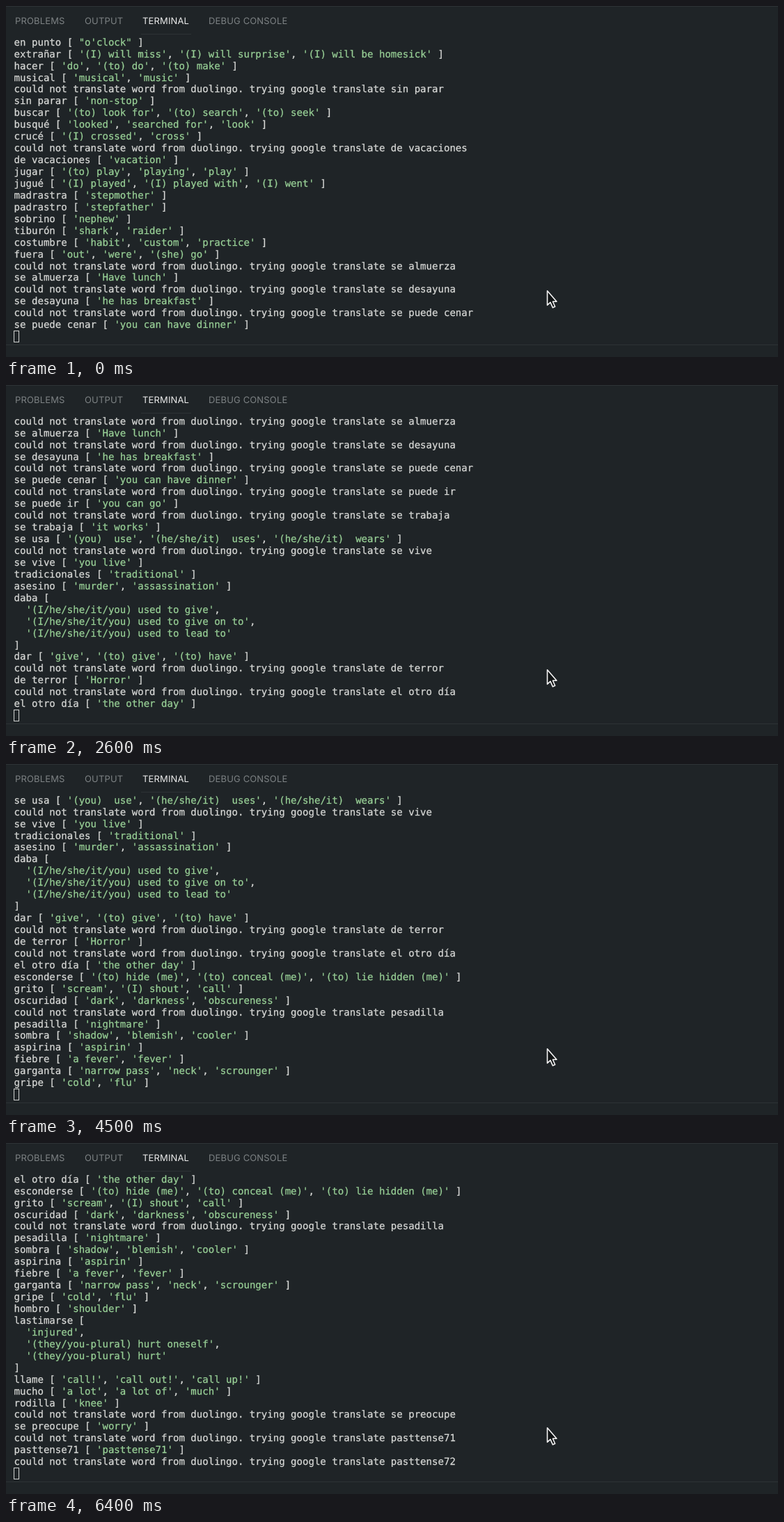
An HTML page that plays this animation: 1109 px wide and 505 px high, repeating every 6500 ms.

```html
<!DOCTYPE html>
<html lang="en">
<head>
<meta charset="utf-8">
<title>Terminal log</title>
<style>
  html, body { margin: 0; width: 100%; height: 100%; overflow: hidden; background: #1f2427; }
  body { position: relative; text-rendering: geometricPrecision; }
  body > * { position: absolute; }
  .tab { top: 14px; font: 13px/16px Inter, sans-serif; letter-spacing: .15px; color: #7d8284; white-space: pre; }
  .on { color: #ececec; }
  .rule { left: 0; width: 100%; height: 1px; background: #2d3335; }
  #log { left: 11.6px; top: 44.7px; margin: 0; font: 14.06px/16.93px "DejaVu Sans Mono", monospace; color: #d8d9d7; -webkit-text-stroke: .25px; }
  #log i { font-style: normal; color: #99d197; }
  #caret { left: 11px; top: 467px; width: 6px; height: 15px; border: 1px solid #d0d2d1; }
</style>
</head>
<body>
<div class="rule" style="top:0"></div>
<div class="rule" style="top:487px"></div>
<div class="rule" style="top:40px;left:194px;width:72px"></div>
<span class="tab" style="left:13px">PROBLEMS</span>
<span class="tab" style="left:113px">OUTPUT</span>
<span class="tab on" style="left:196px">TERMINAL</span>
<span class="tab" style="left:291px">DEBUG CONSOLE</span>
<pre id="log"></pre>
<div id="caret"></div>
<svg style="left:770px;top:400px" width="30" height="44">
  <path d="M7.6 9.8V30.4L12 26.4L15.4 33.9L18.7 32.5L15.5 25.2H21Z" fill="#111415" stroke="#f4f4f4" stroke-width="1.6" stroke-linejoin="round"/>
</svg>
<script>
const LOOP = 6500, ROWS = 25;

// "?phrase" is a failed lookup; "word: a, b" is a result.
const entries = `en punto: o'clock
extrañar: (I) will miss, (I) will surprise, (I) will be homesick
hacer: do, (to) do, (to) make
musical: musical, music
?sin parar
sin parar: non-stop
buscar: (to) look for, (to) search, (to) seek
busqué: looked, searched for, look
crucé: (I) crossed, cross
?de vacaciones
de vacaciones: vacation
jugar: (to) play, playing, play
jugué: (I) played, (I) played with, (I) went
madrastra: stepmother
padrastro: stepfather
sobrino: nephew
tiburón: shark, raider
costumbre: habit, custom, practice
fuera: out, were, (she) go
?se almuerza
se almuerza: Have lunch
?se desayuna
se desayuna: he has breakfast
?se puede cenar
se puede cenar: you can have dinner
?se puede ir
se puede ir: you can go
?se trabaja
se trabaja: it works
se usa: (you)  use, (he/she/it)  uses, (he/she/it)  wears
?se vive
se vive: you live
tradicionales: traditional
asesino: murder, assassination
daba: (I/he/she/it/you) used to give, (I/he/she/it/you) used to give on to, (I/he/she/it/you) used to lead to
dar: give, (to) give, (to) have
?de terror
de terror: Horror
?el otro día
el otro día: the other day
esconderse: (to) hide (me), (to) conceal (me), (to) lie hidden (me)
grito: scream, (I) shout, call
oscuridad: dark, darkness, obscureness
?pesadilla
pesadilla: nightmare
sombra: shadow, blemish, cooler
aspirina: aspirin
fiebre: a fever, fever
garganta: narrow pass, neck, scrounger
gripe: cold, flu
hombro: shoulder
lastimarse: injured, (they/you-plural) hurt oneself, (they/you-plural) hurt
llame: call!, call out!, call up!
mucho: a lot, a lot of, much
rodilla: knee
?se preocupe
se preocupe: worry
?pasttense71
pasttense71: pasttense71
?pasttense72`.split("\n").map(format);

// Moments, in tenths of a second, at which another entry is printed
const prints = [2, 4, 6, 8, 10, 12, 14, 15, 17, 19, 20, 22, 24, 25, 26, 28, 30, 32,
  34, 35, 37, 39, 41, 43, 45, 46, 48, 50, 52, 53, 55, 57, 59, 61, 63];

function quote(s) {
  const q = s.includes("'") ? '"' : "'";
  return `<i>${q}${s}${q}</i>`;
}

function format(entry) {
  if (entry[0] === "?")
    return ["could not translate word from duolingo. trying google translate " + entry.slice(1)];
  const [word, list] = entry.split(": ");
  const items = list.split(", ");
  const quoted = items.map(quote);
  const width = list.length + 2 * items.length;
  return width > 65
    ? [word + " [", ...quoted.join(",\n").split("\n").map(s => "  " + s), "]"]
    : [`${word} [ ${quoted.join(", ")} ]`];
}

const log = document.getElementById("log");
const first = entries.length - prints.length;
let shown = -1;

function draw(now) {
  const t = now % LOOP;
  const count = first + prints.filter(p => p * 100 <= t).length;
  if (count !== shown) {
    shown = count;
    log.innerHTML = entries.slice(0, count).flat().slice(-ROWS).join("\n");
  }
  requestAnimationFrame(draw);
}
draw(0);
</script>
</body>
</html>
```
